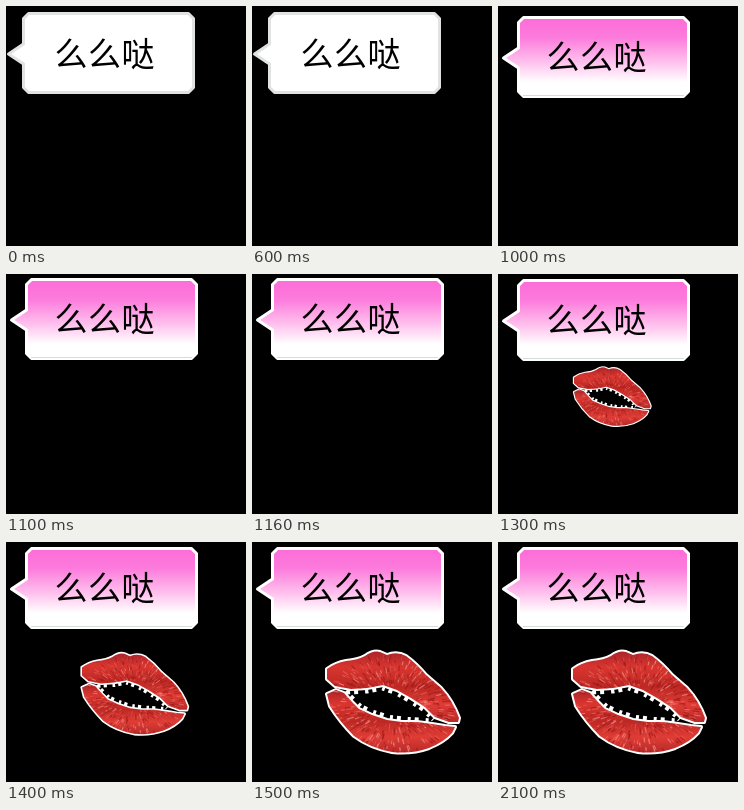
Recreate the animation shown at these times as an HTML page. Size 240 by 240 pixels, loop 2.5 s.

```html
<!DOCTYPE html>
<html lang="zh">
<head>
<meta charset="utf-8">
<style>
  html, body { margin: 0; width: 100%; height: 100%; overflow: hidden; background: #000; }
  svg { display: block; width: 100vw; height: 100vh; }
  text { font: 300 33px "Noto Sans CJK SC", "Noto Sans CJK", sans-serif; letter-spacing: .5px; }
</style>
</head>
<body>
<svg viewBox="0 0 240 240">
  <defs>
    <linearGradient id="pink" x2="0" y2="1">
      <stop offset="0" stop-color="#fd6cd8"/>
      <stop offset=".25" stop-color="#fc7bdc"/>
      <stop offset=".55" stop-color="#ffbdec"/>
      <stop offset=".82" stop-color="#fff"/>
    </linearGradient>
    <linearGradient id="red" x2="0" y2="1">
      <stop offset="0" stop-color="#ab2529"/>
      <stop offset=".22" stop-color="#d9352f"/>
      <stop offset=".5" stop-color="#bd2824"/>
      <stop offset=".75" stop-color="#df3c35"/>
      <stop offset="1" stop-color="#b92a29"/>
    </linearGradient>
    <g id="lipShape">
      <path id="upperLip" d="M0 18 Q8 12 19 10 Q31 9 38 5 Q46 -1 53 1 L60 4 Q70 0 79 5
        Q90 13 99 24 L114 37 Q126 50 132 67 L131 71 L122 71 L108 66
        L98 56 L84 47 L70 39 L56 34 L40 37 L24 38 L8 35 L0 28 Z"/>
      <path id="lowerLip" d="M0 43 L9 39 L17 42 L25 51 L32 58 L45 64 L60 69 L75 71 L90 71
        L105 73 L118 75 L128 76 L125 82 Q117 91 102 97 Q85 103 65 101
        Q43 97 27 85 Q13 71 3 55 Z"/>
    </g>
    <clipPath id="lipClip"><use href="#upperLip"/><use href="#lowerLip"/></clipPath>
  </defs>
  <g id="lips">
    <use href="#lipShape" fill="none" stroke="#fff" stroke-width="4" stroke-linejoin="round"/>
    <!-- Ragged white fringe inside the mouth -->
    <path d="M20 39 L40 38 L56 35 L70 40 L84 48 L98 57 L108 67 M17 42 L25 50 L32 57 L45 63 L60 68 L75 70 L105 72"
      fill="none" stroke="#fff" stroke-width="9" stroke-dasharray="3 4 4 7"/>
    <use href="#lipShape" fill="url(#red)"/>
    <g id="creases" clip-path="url(#lipClip)"></g>
  </g>
  <g id="bubble">
    <path id="shape" stroke-width="3" stroke-linejoin="round"
      d="M24.5 .5 H184.5 L189.5 5.5 V74.5 L184.5 79.5 H24.5 L19.5 74.5 V51 L4.5 41 L19.5 31 V5.5 Z"/>
    <path id="shade" d="M24 78.5 H185" stroke="#d3dddb"/>
  </g>
  <text id="words" x="48.5">么么哒</text>
</svg>
<script>
  const el = id => document.getElementById(id);
  const LOOP = 2500, START = 1000, STEP = 100;

  // Bubble top, text baseline, then lips: left, top, scale
  const poses = [
    { top: 7, base: 60 },
    { top: 11, base: 63 },
    { top: 5, base: 57 },
    { top: 12, base: 65, lips: [44, 62, .42] },
    { top: 6, base: 58, lips: [76, 93, .58] },
    { top: 6, base: 58, lips: [76, 111, .8] },
    { top: 6, base: 58, lips: [75, 109, 1] }
  ];

  let seed = 7;
  const random = () => (seed = seed * 16807 % 2147483647) / 2147483647;

  // Fine creases fan out from the middle of the mouth.
  function drawCreases() {
    const colors = ["#ef6a60", "#9c1819", "#e8564e", "#8d1718", "#f6a198"];
    let marks = "";
    for (let i = 0; i < 500; i++) {
      const angle = random() * Math.PI * 2;
      const from = .35 + random() * .6, to = from + .04 + random() * .08;
      const x = r => (66 + 66 * r * Math.cos(angle)).toFixed(1);
      const y = r => (54 + 50 * r * Math.sin(angle)).toFixed(1);
      marks += `<path d="M${x(from)} ${y(from)}L${x(to)} ${y(to)}" stroke="${colors[i % 5]}"
        stroke-width="${(.7 + random() * .7).toFixed(1)}" opacity=".6"/>`;
    }
    el("creases").innerHTML = marks;
  }

  function draw(time) {
    const t = time % LOOP;
    const index = t < START ? 0 : Math.min(6, 1 + Math.floor((t - START) / STEP));
    const { top, base, lips } = poses[index];
    const plain = index === 0;
    el("bubble").setAttribute("transform", `translate(${plain ? -2 : 1} ${top})`);
    el("shape").setAttribute("fill", plain ? "#fff" : "url(#pink)");
    el("shape").setAttribute("stroke", plain ? "#e0e3e1" : "#fff");
    el("shade").setAttribute("visibility", plain ? "hidden" : "visible");
    el("words").setAttribute("y", base);
    el("lips").setAttribute("visibility", lips ? "visible" : "hidden");
    if (lips) {
      const [x, y, scale] = lips;
      el("lips").setAttribute("transform", `translate(${x} ${y}) scale(${scale})`);
    }
  }

  drawCreases();
  const begin = performance.now();
  function tick() {
    draw(performance.now() - begin);
    requestAnimationFrame(tick);
  }
  tick();
</script>
</body>
</html>
```
